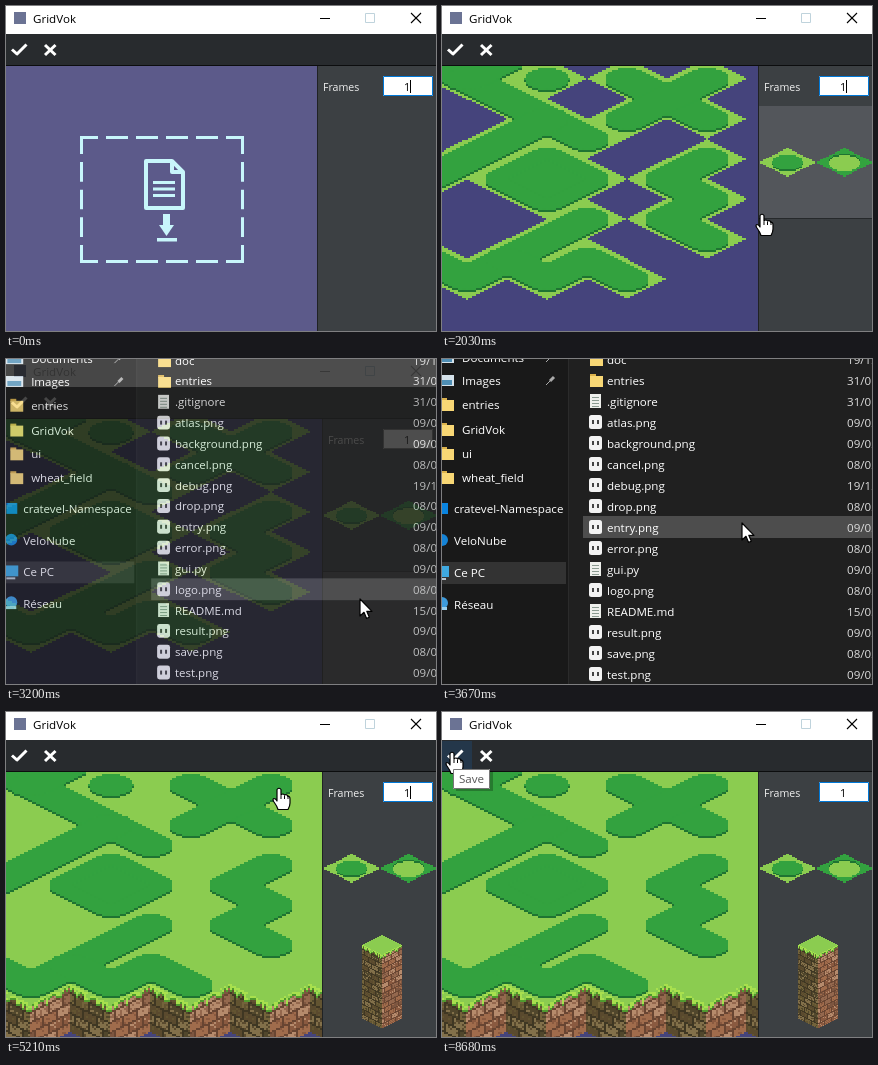
These frames come from a looping animation (430x325 px, 8.7 s). An HTML page with a canvas:

```html
<!DOCTYPE html>
<html lang="fr">
<head>
<meta charset="utf-8">
<style>
html, body { margin: 0; width: 430px; height: 325px; overflow: hidden; background: #3c4043; }
canvas { display: block; }
</style>
</head>
<body>
<canvas id="stage" width="430" height="325"></canvas>
<script>
const LOOP = 8700, FONT = '"Open Sans", "Noto Sans", sans-serif', APP = 'GridVok';
const LIGHT = '#8bcc50', DARK = '#33a23f', SHADE = '#1f7432', VOID = '#45447c';
const PANEL = '#3c4043', BAR = '#282b2e', ICE = '#c8f6fb';
const stage = document.getElementById('stage').getContext('2d');
let ctx = stage;

const ramp = (t, a, b) => Math.max(0, Math.min(1, (t - a) / (b - a)));
const hash = (a, b, c = 0) => {
  const s = Math.sin(a * 127.1 + b * 311.7 + c * 74.7) * 43758.5453;
  return s - Math.floor(s);
};

function rect(x, y, w, h, color, g = ctx) {
  g.fillStyle = color;
  g.fillRect(x, y, w, h);
}
function disc(x, y, r, color) {
  ctx.fillStyle = color;
  ctx.beginPath();
  ctx.arc(x, y, r, 0, 7);
  ctx.fill();
}
function frame(x, y, w, h, color) {
  ctx.strokeStyle = color;
  ctx.lineWidth = 1;
  ctx.strokeRect(x + .5, y + .5, w - 1, h - 1);
}
function text(s, x, y, color = '#fff', size = 11.6) {
  ctx.font = `${size}px ${FONT}`;
  ctx.fillStyle = color;
  ctx.fillText(s, x, y);
}
function line(color, width, ...pts) {
  ctx.strokeStyle = color;
  ctx.lineWidth = width;
  ctx.beginPath();
  pts.forEach(p => ctx.lineTo(...p));
  ctx.stroke();
}

// ---- pixel art ----
function layer(w, h, draw) {
  const c = document.createElement('canvas');
  c.width = w;
  c.height = h;
  if (draw) draw(c.getContext('2d'));
  return c;
}
// One-colour layer without soft edges
function flat(w, h, color, draw) {
  return layer(w, h, g => {
    g.fillStyle = g.strokeStyle = color;
    draw(g);
    const img = g.getImageData(0, 0, w, h);
    for (let i = 3; i < img.data.length; i += 4) img.data[i] = img.data[i] > 127 ? 255 : 0;
    g.putImageData(img, 0, 0);
  });
}
function diamond(g, x, y) {
  g.beginPath();
  g.moveTo(x - 20, y);
  g.lineTo(x, y - 10);
  g.lineTo(x + 20, y);
  g.lineTo(x, y + 10);
  g.fill();
}

const MW = 160, MH = 134;
const tx = a => 12.5 + 20 * a, ty = b => 6.5 + 10 * b;
// Grass strands as tile coordinates; the closed one is filled
const strands = [
  [[4, 0], [6, 2]], [[6, 0], [4, 2]], [[2, 0], [2, 0]],
  [[2, 4], [1, 5], [2, 6], [3, 5], [2, 4]],
  [[6, 4], [5, 5], [6, 6], [5, 7], [6, 8]],
  [[-2, -2], [3, 3]], [[0, 0], [1, -1]], [[2, 2], [-2, 6]],
  [[3, 7], [0, 10], [-1, 9]],
  [[1, 9], [2, 10], [3, 9], [4, 10]]
];
const grass = color => flat(MW, MH, color, g => {
  g.scale(1, .5);
  g.lineWidth = 22;
  g.lineCap = g.lineJoin = 'round';
  for (const s of strands) {
    const end = s[s.length - 1];
    g.beginPath();
    s.forEach(([a, b]) => g.lineTo(tx(a), ty(b) * 2));
    g.lineTo(tx(end[0]) + .01, ty(end[1]) * 2);
    g.stroke();
    if (String(s[0]) === String(end)) g.fill();
  }
});
const ground = flat(MW, MH, LIGHT, g => {
  for (const s of strands) for (let i = 1; i < s.length; i++) {
    const [a, b] = s[i - 1], [c, d] = s[i], n = Math.abs(c - a);
    for (let k = 0; k <= n; k++) diamond(g, tx(a + Math.sign(c - a) * k), ty(b + Math.sign(d - b) * k));
  }
});
const grassShade = grass(SHADE), grassTop = grass(DARK);
function addGrass(g) {
  g.drawImage(grassShade, 0, 1);
  g.drawImage(grassTop, 0, 0);
}

const stones = [
  ['#625431', '#73633b', '#51472c', '#82704a', '#5a4a2e'],
  ['#a06c4c', '#8a5a40', '#b58a6c', '#94684e', '#7d5640']
];
function pillar(g, cx, cy, h) {
  for (let x = -20; x < 20; x++) {
    const side = x < 0 ? 0 : 1, u = side ? x : x + 20;
    const top = Math.floor(cy + 10 - Math.abs(x + .5) / 2);
    const tuft = 2 + Math.floor(hash(x, 5) * 4);
    for (let y = 0; y < h; y++) {
      const row = Math.floor(y / 5), v = u + row % 2 * 4, col = Math.floor(v / 7);
      const joint = y % 5 === 4 || v % 7 === 6;
      let k = Math.floor(hash(row, col, side) * 5);
      if (hash(x, y) > .75) k = (k + 1) % 5;
      let color = joint ? (side ? '#684532' : '#3f3723') : stones[side][k];
      if (y < tuft) color = y === tuft - 1 ? '#4f9a2e' : hash(x, y, 3) > .3 ? '#a8e04e' : LIGHT;
      rect(cx + x, top + y, 1, 1, color, g);
    }
  }
}

const islands = layer(MW, MH, g => {
  rect(0, 0, MW, MH, VOID, g);
  g.drawImage(ground, 0, 0);
  addGrass(g);
});
const meadow = layer(MW, MH, g => {
  rect(0, 0, MW, ty(10), LIGHT, g);
  for (let a = 0; a <= 8; a += 2) {
    g.drawImage(flat(MW, MH, LIGHT, f => diamond(f, tx(a), ty(10))), 0, 0);
    pillar(g, Math.floor(tx(a)), ty(10), 24);
  }
  addGrass(g);
});
const column = layer(42, 98, g => {
  g.drawImage(flat(42, 98, LIGHT, f => diamond(f, 21, 11)), 0, 0);
  pillar(g, 21, 11, 74);
});
const pair = layer(80, 20, g => {
  const oval = (x, y, color) => g.drawImage(flat(80, 20, color, f => {
    f.beginPath();
    f.ellipse(x, y, 11, 5.5, 0, 0, 7);
    f.fill();
  }), 0, 0);
  [[20, LIGHT], [60, DARK]].forEach(([x, c]) =>
    g.drawImage(flat(80, 20, c, f => diamond(f, x, 10)), 0, 0));
  oval(20, 11, SHADE);
  oval(20, 10, DARK);
  oval(60, 9.5, SHADE);
  oval(60, 10.5, LIGHT);
});

// ---- application window ----
function dropZone() {
  rect(0, 60, 311, 265, '#5c5a8a');
  const side = (dash, offset, ...pts) => {
    ctx.setLineDash([dash, 8]);
    ctx.lineDashOffset = offset;
    line(ICE, 3, ...pts);
  };
  for (const y of [131.5, 255.5]) side(22, 4, [74, y], [238, y]);
  for (const x of [75.5, 236.5]) side(19.67, 1.67, [x, 130], [x, 257]);
  ctx.setLineDash([]);
  ctx.lineJoin = 'round';
  line(ICE, 4, [166, 155], [140, 155], [140, 202], [177, 202], [177, 166], [166, 155], [166, 166], [177, 166]);
  for (const y of [175, 181.5, 188]) rect(147, y, 22, 3, ICE);
  rect(157, 208, 7, 12, ICE);
  ctx.beginPath();
  [[153, 219], [168, 219], [160.5, 230]].forEach(p => ctx.lineTo(...p));
  ctx.fill();
  rect(151, 232, 20, 3.5, ICE);
}

function appWindow(t) {
  const loaded = t >= 960, full = t >= 5130, left = loaded ? 316 : 311;
  const active = t < 260 || (t >= 440 && t < 2790) || t >= 5040;
  const hover = t < 960 || t >= 5040 ? '' : t < 1960 ? 'map' : t < 2060 ? 'top' : 'low';

  rect(0, 0, 430, 28, '#fff');
  rect(8, 6, 12, 12, '#6b7394');
  const ink = active ? '#000' : '#999';
  text(APP, 27, 17, ink);
  rect(314, 12, 10, 1, ink);
  frame(359, 7, 10, 10, '#bfd3dc');
  line(ink, 1.1, [405, 7], [415, 17]);
  line(ink, 1.1, [415, 7], [405, 17]);

  rect(0, 28, 430, 32, BAR);
  if ((t >= 6620 && t < 6920) || t >= 7200) rect(0, 29, 30, 30, '#24374a');
  line('#fff', 3, [6, 43.5], [11, 48], [20.5, 38.5]);
  line('#fff', 3, [39, 39], [49.5, 49]);
  line('#fff', 3, [49.5, 39], [39, 49]);
  rect(0, 59, 430, 1, '#0c0d0e');

  if (loaded) {
    ctx.imageSmoothingEnabled = false;
    ctx.drawImage(full ? meadow : islands, 0, 60, MW * 2, MH * 2);
    if (hover === 'map') rect(0, 60, 316, 265, 'rgba(255,255,255,.12)');
  } else dropZone();

  rect(left, 60, 430 - left, 265, PANEL);
  rect(left, 60, 1, 265, '#202224');
  if (hover === 'top' || hover === 'low') {
    rect(317, hover === 'top' ? 100 : 213, 113, 112, '#53565b');
    rect(317, 212, 113, 1, '#26292b');
  }
  if (loaded) ctx.drawImage(pair, 317, 142, 114, 28.5);
  if (full) ctx.drawImage(column, 355, 222);

  text('Frames', left + 6, 85, '#eee', 10.6);
  rect(377, 70, 50, 20, '#fff');
  frame(377, 70, 50, 20, active ? '#0078d7' : '#7a7a7a');
  text('1', 398, 85, '#000', 11);
  const blink = (t >= 5730 && t < 6420) || (t >= 7170 && t < 7790) || t >= 8460;
  if (active && !blink) rect(404, 74, 1, 13, '#000');
}

// ---- file browser ----
const files = ['doc 19/12', 'entries 31/05', '.gitignore 31/05', 'atlas.png 09/02', 'background.png 09/02',
  'cancel.png 08/02', 'debug.png 19/12', 'drop.png 08/02', 'entry.png 09/02', 'error.png 08/02',
  'gui.py 09/02', 'logo.png 08/02', 'README.md 15/03', 'result.png 09/02', 'save.png 08/02', 'test.png 09/02'];
const places = [['Documents', -2], ['Images', 21], ['entries', 45], [APP, 70], ['ui', 94], ['wheat_field', 118]];

function folder(x, y) {
  rect(x, y - 6, 6, 3, '#dcb24c');
  rect(x, y - 4, 13, 11, '#f8d775');
}
function page(x, y) {
  rect(x, y - 7, 11, 14, '#eef0ec');
  for (let k = 0; k < 4; k++) rect(x + 2, y - 4 + k * 3, 7, 1, '#8a9a90');
}
function picture(x, y) {
  ctx.fillStyle = '#f2f2f2';
  ctx.beginPath();
  ctx.roundRect(x, y - 7, 13, 14, 2.5);
  ctx.fill();
  rect(x + 3, y - 2, 2, 4, '#444');
  rect(x + 8, y - 2, 2, 4, '#444');
}

function sidebar() {
  rect(-60, -40, 187, 400, '#191919');
  rect(126, -40, 1, 400, '#2b2b2b');
  rect(-60, 203, 184, 22, '#333');
  for (const [name, y] of places) {
    if (y > 30) folder(-1, y);
    else {
      rect(-6, y - 5, 18, 11, '#d5e2ea');
      rect(-4, y, 14, 5, '#4f8fb5');
      line('#aaa', 3, [108, y + 1], [112, y - 3]);
      line('#aaa', 1, [104, y + 5], [108, y + 1]);
    }
    text(name, 20, y + 5);
  }
  rect(-5, 144, 11, 11, '#0a84e0');
  text('cratevel-Namespace', 12, 154);
  disc(0, 181, 6, '#1583d6');
  text('VeloNube', 12, 186);
  rect(-9, 207, 16, 11, '#3fa9e0');
  rect(-5, 219, 9, 2, '#b8c6d0');
  text('Ce PC', 12, 218);
  disc(0, 244, 6, '#3d9bdc');
  rect(-7, 248, 12, 3, '#9ad0ee');
  text('Réseau', 12, 250);
}

function browser(t, pointerY) {
  rect(-60, -40, 1400, 400, '#202020');
  sidebar();
  const row = Math.round(pointerY / 21);
  rect(141, row * 21 - 11, 700, 22, t < 4620 ? '#4d4d4d' : t < 4690 ? '#666' : '#777');
  files.forEach((f, i) => {
    const [name, date] = f.split(' '), y = i * 21;
    if (i < 2) folder(148, y);
    else if (name.endsWith('.png')) picture(147, y);
    else page(148, y);
    text(name, 165, y + 4.5);
    text(date + '/2021', 405, y + 4.5, '#ddd');
  });
  if (t >= 4370 && t < 4640) {
    ctx.globalAlpha = ramp(t, 4370, 4460);
    rect(273, 96, 170, 49, '#2b2b2b');
    frame(273, 96, 170, 49, '#767676');
    ['Type d’élément : Fichier PNG', 'Dimensions : 40 x 89', 'Taille : 3,30 Ko']
      .forEach((s, i) => text(s, 279, 109 + i * 15, '#fff', 11.3));
    ctx.globalAlpha = 1;
  }
}

// Composed apart so that the browser fades as one piece
const sheet = layer(430, 325), sheetCtx = sheet.getContext('2d');
function fadeBrowser(t, y, shown) {
  const s = 1 - .04 * (1 - shown);
  ctx = sheetCtx;
  ctx.setTransform(s, 0, 0, s, 650 * (1 - s), 140 * (1 - s));
  browser(t, (y - 140) / s + 140);
  ctx = stage;
  ctx.globalAlpha = shown;
  ctx.drawImage(sheet, 0, 0);
  ctx.globalAlpha = 1;
}

// ---- pointer ----
const hand = new Path2D('M-2 1.5Q0-1 2 1.5V7Q4 5 5.5 7Q8 6 9 8.5Q11 8 11 11V15Q11 18 9 21.5H-1Q-2 18-5 14Q-7 11-5 10.5Q-3.5 10.5-2 13Z');
const arrow = new Path2D('M0 0V17L4 13.3L6.6 19.4L9.3 18.2L6.8 12.3H12Z');
// Time, x, y
const route = [
  [440, 160, 216], [960, 160, 216], [1820, 288, 198], [2030, 320, 208], [2570, 354, 240],
  [3300, 354, 240], [3650, 300, 165], [3950, 284, 64], [4310, 273, 78], [4850, 273, 78],
  [5200, 273, 76], [5880, 273, 76], [6040, 262, 81], [6740, 3, 38], [6780, 3, 38], [6960, -14, 41],
  [7170, -14, 41], [7440, 6, 42], [7790, 6, 42], [7940, 10, 40], [LOOP, 10, 40]
];
function pointerAt(t) {
  const i = Math.max(1, route.findIndex(k => k[0] > t));
  const [t0, x0, y0] = route[i - 1], [t1, x1, y1] = route[i];
  const p = ramp(t, t0, t1), e = p * p * (3 - 2 * p);
  return [x0 + (x1 - x0) * e, y0 + (y1 - y0) * e];
}
function pointer(t, x, y) {
  const shape = t >= 3060 && t < 5030 ? arrow : hand;
  ctx.save();
  ctx.translate(Math.round(x), Math.round(y));
  ctx.fillStyle = '#fff';
  ctx.strokeStyle = '#000';
  ctx.lineWidth = 1.2;
  ctx.fill(shape);
  ctx.stroke(shape);
  if (shape === hand) for (const k of [2, 5.5, 9]) line('#000', 1, [k, 7.5], [k, 11]);
  ctx.restore();
}

function saveTip(alpha) {
  ctx.globalAlpha = alpha;
  rect(14, 60, 37, 19, 'rgba(0,0,0,.25)');
  rect(11, 57, 37, 20, '#fff');
  frame(11, 57, 37, 20, '#767676');
  text('Save', 17, 71, '#575757');
  ctx.globalAlpha = 1;
}

function draw(t) {
  const [x, y] = pointerAt(t);
  const shown = ramp(t, 3030, 3245) * (1 - ramp(t, 4850, 5030));
  appWindow(t);
  if (shown > 0) fadeBrowser(t, y, shown);
  if (t >= 440) pointer(t, x, y);
  if (t >= 8600) saveTip(ramp(t, 8600, 8680));
}

const start = performance.now();
function tick() {
  draw((performance.now() - start) % LOOP);
  requestAnimationFrame(tick);
}
tick();
</script>
</body>
</html>
```
